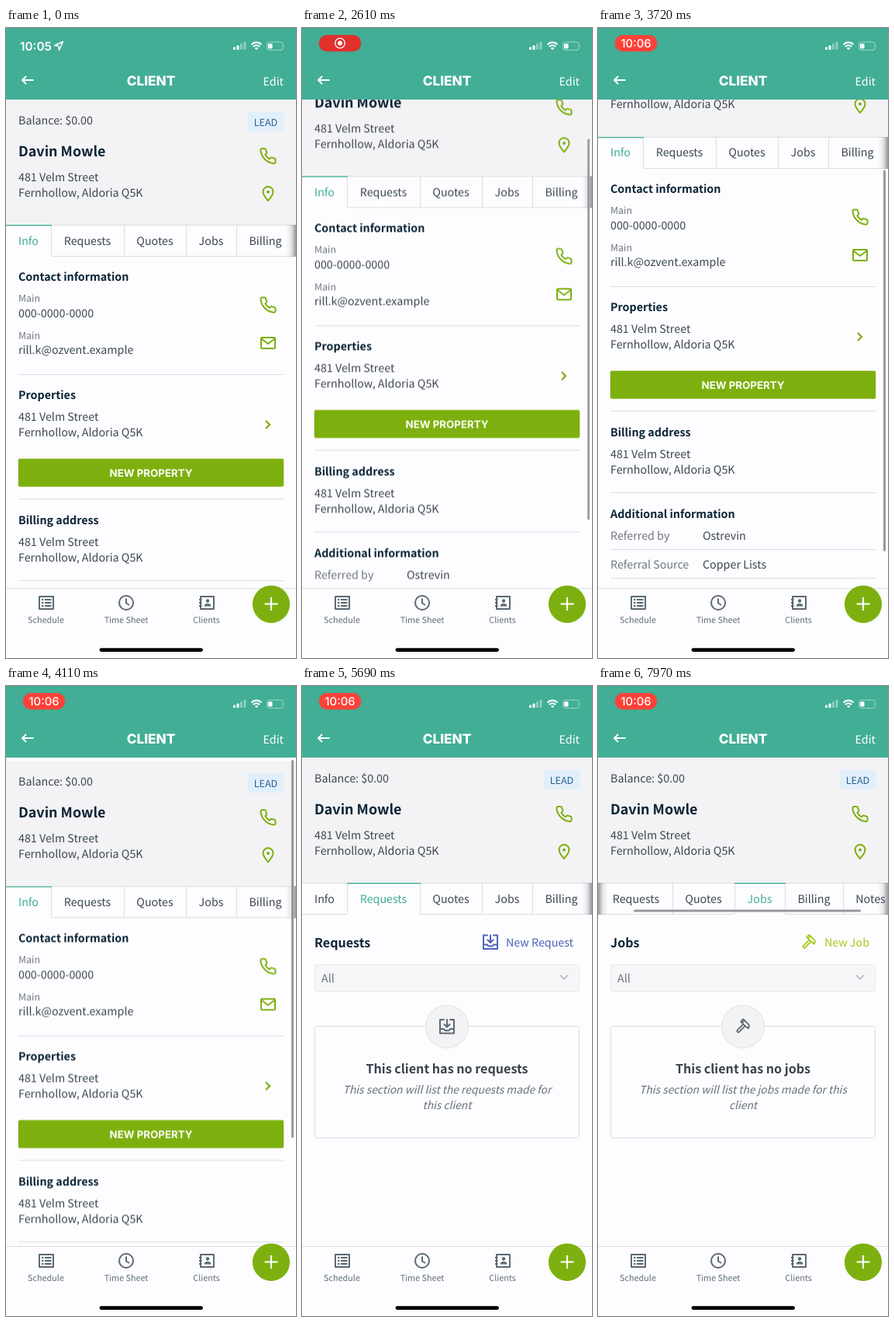
These frames come from a looping animation (374x810 px, 8 s). An HTML page:

```html
<!DOCTYPE html>
<html lang="en">
<head>
<meta charset="utf-8">
<title>Client</title>
<style>
html, body { margin: 0; width: 100%; height: 100%; overflow: hidden; background: #fdfcfe; }
svg { display: block; }
text {
  font: 14.29px "Noto Sans CJK JP", "Noto Sans CJK SC", "Noto Sans CJK", "Open Sans", sans-serif;
  fill: #3a4853; text-rendering: geometricPrecision; white-space: pre;
}
.bold { font-weight: 700; fill: #0a2436; }
.name { font-size: 17.9px; }
.muted { fill: #6b7882; }
.small { font-size: 12.4px; }
.nav { font-size: 10.8px; fill: #5f6f7a; text-anchor: middle; }
.mid { text-anchor: middle; }
.end { text-anchor: end; }
.white { fill: #fff; }
.ui { font-family: Inter, sans-serif; fill: #fff; }
.teal { fill: #41ae95; }
.head { font-size: 16.1px; }
.note { font-size: 13.83px; font-style: italic; fill: #65727c; }
.line { stroke: #dcdde3; stroke-width: 1; fill: none; }
.icon { fill: none; stroke: currentColor; stroke-width: 2; stroke-linejoin: round; stroke-linecap: round; }
.green { color: #7db00e; }
.slate { color: #5a6a75; }
.bar { fill: #98989e; }

#scroll, #thumb, #tabs, #thumbX, .shadeL, .pill, .pill rect, .rec, .clock, .start, .info, .requests, .quotes, .jobs {
  animation: 8s linear infinite;
}
#scroll { animation-name: scroll; }
#thumb { animation-name: thumb; }
#tabs { animation-name: slide; }
#thumbX { animation-name: thumbX; }
.shadeL { animation-name: shade; }
.pill { animation-name: appear; }
.pill rect { animation-name: pulse; }
.rec { animation-name: recording; }
.clock { animation-name: clock; }
.start { animation-name: vanish; }
.info { animation-name: info; }
.requests { animation-name: requests; }
.quotes { animation-name: quotes; }
.jobs { animation-name: jobs; }
.info, .requests, .quotes, .jobs { animation-timing-function: step-end; }

@keyframes scroll {
  0%, 31% { transform: translateY(0); animation-timing-function: ease-in; }
  32.75% { transform: translateY(-70px); }
  34.25% { transform: translateY(-150px); animation-timing-function: ease-out; }
  35.75% { transform: translateY(-179.5px); animation-timing-function: ease-in-out; }
  38.75%, 42% { transform: translateY(-176px); animation-timing-function: ease-in; }
  46.5% { transform: translateY(-113.4px); }
  49.9% { transform: translateY(-8px); animation-timing-function: ease-out; }
  50.6%, 51.375% { transform: translateY(4.4px); animation-timing-function: ease-out; }
  55%, 100% { transform: translateY(0); }
}
@keyframes thumb {
  0%, 31% { transform: translateY(95px); height: 490px; opacity: 0; animation-timing-function: ease-in; }
  32.75% { transform: translateY(148px); height: 490px; opacity: 1; }
  34.25% { transform: translateY(208px); height: 490px; animation-timing-function: ease-out; }
  35.75% { transform: translateY(237px); height: 480px; animation-timing-function: ease-in-out; }
  38.75%, 42% { transform: translateY(228px); height: 490px; animation-timing-function: ease-in; }
  46.5% { transform: translateY(183px); height: 490px; }
  49.9% { transform: translateY(101px); height: 490px; animation-timing-function: ease-out; }
  50.6%, 51.375% { transform: translateY(95px); height: 486px; }
  55% { transform: translateY(95px); height: 490px; opacity: 1; }
  58%, 100% { transform: translateY(95px); height: 490px; opacity: 0; }
}
@keyframes slide {
  0%, 93.2% { transform: translateX(0); animation-timing-function: ease-in-out; }
  99.6%, 100% { transform: translateX(-56px); }
}
@keyframes thumbX {
  0%, 93.2% { transform: translateX(3px); opacity: 0; animation-timing-function: ease-in-out; }
  99.6%, 100% { transform: translateX(46px); opacity: 1; }
}
@keyframes shade { 0%, 93.2% { opacity: 0; } 95%, 100% { opacity: 1; } }
@keyframes appear { 0%, 1% { opacity: 0; } 5%, 100% { opacity: 1; } }
@keyframes vanish { 0%, 1% { opacity: 1; } 4%, 100% { opacity: 0; } }
@keyframes pulse {
  0%, 8% { fill: #ff4036; }
  20%, 36% { fill: #e0302b; }
  42%, 100% { fill: #ff4138; }
}
@keyframes recording { 0%, 40% { opacity: 1; } 42%, 100% { opacity: 0; } }
@keyframes clock { 0%, 41% { opacity: 0; } 43%, 100% { opacity: 1; } }
@keyframes info { 0% { opacity: 1; } 59.375%, 100% { opacity: 0; } }
@keyframes requests { 0% { opacity: 0; } 59.375% { opacity: 1; } 78.125%, 100% { opacity: 0; } }
@keyframes quotes { 0% { opacity: 0; } 78.125% { opacity: 1; } 87.5%, 100% { opacity: 0; } }
@keyframes jobs { 0% { opacity: 0; } 87.5%, 100% { opacity: 1; } }
</style>
</head>
<body>
<svg width="374" height="810" viewBox="0 0 374 810">
  <defs>
    <linearGradient id="fade">
      <stop offset="0" stop-color="#77777f" stop-opacity="0"/>
      <stop offset=".5" stop-color="#77777f" stop-opacity=".16"/>
      <stop offset="1" stop-color="#77777f" stop-opacity=".72"/>
    </linearGradient>
    <!-- icons are centred on 0,0 -->
    <g id="phone" class="icon">
      <path d="M9.5 5v2.7a2 2 0 0 1-2.2 2A19 19 0 0 1-9.6-7.2a2 2 0 0 1 2-2.3h2.9a2 2 0 0 1 2 1.7q.3 1.5.9 2.9a2 2 0 0 1-.5 2L-3.6-1.6a15.5 15.5 0 0 0 5.5 5.5L3.2 2.6a2 2 0 0 1 2-.5q1.4.5 2.7.8a2 2 0 0 1 1.6 2.1z"/>
    </g>
    <g id="pin" class="icon">
      <path d="M0 9C-3.5 5-6.5 1.5-6.5-2.5a6.5 6.5 0 0 1 13 0C6.5 1.5 3.5 5 0 9z"/>
      <circle cy="-2.3" r="2" fill="currentColor" stroke="none"/>
    </g>
    <g id="mail" class="icon">
      <rect x="-9" y="-7" width="18" height="14" rx="1"/>
      <path d="M-8.5-5.5 0 1 8.5-5.5"/>
    </g>
    <path id="right" class="icon" style="stroke-width:2.3;stroke-linecap:butt;stroke-linejoin:miter" d="M-3-5 2 0-3 5"/>
    <path id="down" class="icon" style="stroke-width:1.5" d="M-4.5-2.2 0 2.3 4.5-2.2"/>
    <g id="tray" class="icon">
      <path d="M-4-8.5H-9V9H9V-8.5H4M-9 3.5H-4q.5 2 2 2H2q1.5 0 2-2H9M0-8.5V.5M-3.5-2.5 0 1 3.5-2.5"/>
    </g>
    <g id="hammer" class="icon" transform="rotate(45) scale(.9)">
      <path d="M-1.8-2.5V9.5a1.8 1.8 0 0 0 3.6 0V-2.5M-4.5-7.5H3q3.5 0 4.5 4.5Q5.5-3.5 4-2.5H-4.5zM-4.5-7.5H-7V-2.5H-4.5"/>
    </g>
    <g id="quote" class="icon">
      <path d="M-7-9H3L7-5V9H-7zM-3.5-3H1M-3.5 1H3.5M-3.5 5H3.5"/>
    </g>
  </defs>

  <rect width="374" height="810" fill="#fdfcfe"/>

  <g id="scroll">
    <rect y="92" width="374" height="161" fill="#f3f2f4"/>
    <text x="16" y="124">Balance: $0.00</text>
    <rect x="312" y="108" width="46" height="25" rx="2" fill="#e1effb"/>
    <text x="335" y="126" class="mid" style="font-size:12.5px;fill:#2a5f92">LEAD</text>
    <text x="16" y="165" class="bold name">Davin Mowle</text>
    <text x="16" y="196.5">481 Velm Street</text>
    <text x="16" y="216.5">Fernhollow, Aldoria Q5K</text>
    <g class="green">
      <use href="#phone" x="338" y="164.5"/>
      <use href="#pin" x="338" y="213"/>
    </g>

    <g id="tabs"></g>
    <rect x="361" y="253" width="13" height="41" fill="url(#fade)"/>
    <rect class="shadeL" x="-13" y="253" width="13" height="41" fill="url(#fade)" style="transform:scaleX(-1)"/>
    <rect id="thumbX" class="bar" y="287.5" width="293" height="3" rx="1.5"/>

    <g class="info">
      <text x="16" y="324.5" class="bold">Contact information</text>
      <text x="16" y="352" class="muted small">Main</text>
      <text x="16" y="371.5">000-0000-0000</text>
      <text x="16" y="400" class="muted small">Main</text>
      <text x="16" y="419">rill.k@ozvent.example</text>
      <text x="16" y="477" class="bold">Properties</text>
      <text x="16" y="505">481 Velm Street</text>
      <text x="16" y="525">Fernhollow, Aldoria Q5K</text>
      <g class="green">
        <use href="#phone" x="338" y="356"/>
        <use href="#mail" x="338" y="405"/>
        <use href="#right" x="338" y="510"/>
      </g>
      <rect x="15.8" y="553.7" width="342.4" height="36" rx="2" fill="#7db00e"/>
      <text x="187" y="576.5" class="ui mid" style="font-size:13.3px;font-weight:700">NEW PROPERTY</text>
      <text x="16" y="637.5" class="bold">Billing address</text>
      <text x="16" y="665.5">481 Velm Street</text>
      <text x="16" y="685.5">Fernhollow, Aldoria Q5K</text>
      <text x="16" y="742.5" class="bold">Additional information</text>
      <text x="16" y="770.5" class="muted">Referred by</text>
      <text x="135" y="770.5">Ostrevin</text>
      <text x="16" y="807.5" class="muted">Referral Source</text>
      <text x="135" y="807.5">Copper Lists</text>
      <text x="16" y="844.5" class="muted">Preferred Tech</text>
      <text x="135" y="844.5">Hob</text>
      <path class="line" d="M16 445.5H358M16 605.5H358M16 710.5H358M16 783.5H358M16 820.5H358"/>
    </g>
    <g id="panels"></g>
  </g>

  <rect id="thumb" class="bar" x="368" width="3" height="490" rx="1.5"/>

  <g id="header">
    <rect width="374" height="92" fill="#41ae95"/>
    <g class="start">
      <text x="18" y="28.5" class="ui" style="font-size:15.3px;font-weight:600">10:05</text>
      <path d="M73.5 17.5 62.5 22.5 67.7 23.3 68.5 28.5z" fill="none" stroke="#fff" stroke-width="1.5" stroke-linejoin="round"/>
    </g>
    <g class="pill">
      <rect x="21.8" y="9" width="54.4" height="21.3" rx="10"/>
      <g class="rec">
        <circle cx="49" cy="19.5" r="6.3" fill="none" stroke="#fff" stroke-width="1.3"/>
        <circle cx="49" cy="19.5" r="3" fill="#fff"/>
      </g>
      <text x="49" y="25" class="ui mid clock" style="font-size:14.8px;font-weight:500">10:06</text>
    </g>
    <g fill="#fff">
      <rect x="293" y="24.5" width="3" height="3.5" rx=".7"/>
      <rect x="297.5" y="22.5" width="3" height="5.5" rx=".7"/>
      <rect x="302" y="20" width="3" height="8" rx=".7" opacity=".4"/>
      <rect x="306.5" y="17.5" width="3" height="10.5" rx=".7" opacity=".4"/>
      <rect x="338" y="20" width="5.5" height="6.5" rx="1.3"/>
      <path d="M358.3 21.3q1.5 1.9 0 3.9z" opacity=".5"/>
      <path d="M323 28.3l-2.2-2.3q2.2-1.8 4.4 0z"/>
    </g>
    <rect x="336.5" y="18" width="20.5" height="10.5" rx="3" fill="none" stroke="#fff" opacity=".5"/>
    <path d="M316.5 21.3q6.5-5.8 13 0M318.8 24q4.2-3.5 8.4 0" fill="none" stroke="#fff" stroke-width="2"/>
    <path d="M35.5 67H21.5M26 62 21 67 26 72" fill="none" stroke="#fff" stroke-width="2"/>
    <text x="187" y="74" class="ui mid" style="font-size:17.2px;font-weight:800">CLIENT</text>
    <text x="358" y="74" class="white end">Edit</text>
  </g>

  <g id="footer">
    <rect y="720" width="374" height="90" fill="#fdfcfe"/>
    <path class="line" d="M0 720.5H374"/>
    <g class="slate">
      <g class="icon" style="stroke-linecap:butt">
        <path d="M43 731H61V747H43zM46 735H48.5M46 739H48.5M46 743H48.5M50 735H58.5M50 739H58.5M50 743H58.5"/>
        <circle cx="155" cy="739" r="9"/>
        <path d="M155 733.5V739.5L159 742"/>
        <path d="M251 731H268V747H251zM249 735H252.5M249 739H252.5M249 743H252.5"/>
      </g>
      <g fill="currentColor">
        <circle cx="260" cy="736.5" r="2.2"/>
        <path d="M255.5 743.5q0-3.5 4.5-3.5t4.5 3.5z"/>
      </g>
    </g>
    <text x="51.5" y="765" class="nav">Schedule</text>
    <text x="155" y="765" class="nav">Time Sheet</text>
    <text x="258.5" y="765" class="nav">Clients</text>
    <circle cx="342" cy="740.8" r="24.1" fill="#7db00e"/>
    <path d="M333.5 740.5H350.5M342 732V749" stroke="#fff" stroke-width="2.2"/>
    <rect x="120.5" y="797.2" width="133.5" height="4.8" rx="2.4"/>
  </g>
</svg>

<script>
const tabs = [
  ['Info', 0, 58], ['Requests', 58, 152], ['Quotes', 152, 232],
  ['Jobs', 232, 297], ['Billing', 297, 372], ['Notes', 372, 443]
];
const label = (name, x, end, cls = '') => `<text x="${(x + end) / 2}" y="278.5" class="mid ${cls}">${name}</text>`;
const divider = x => `<path class="line" d="M${x + .5} 254V293"/>`;

const tab = ([name, x, end]) => label(name, x, end) + divider(end);
const activeTab = ([name, x, end]) => `
  <g class="${name.toLowerCase()}">
    <rect x="${x}" y="253" width="${end - x}" height="42" fill="#fdfcfe"/>
    ${x ? divider(x) : ''}${divider(end)}
    <rect x="${x}" y="253" width="${end - x + 1}" height="1.4" fill="#41ae95"/>
    ${label(name, x, end, 'teal')}
  </g>`;

document.getElementById('tabs').innerHTML =
  '<path class="line" d="M0 253.5H480M0 293.5H480"/>' +
  tabs.map(tab).join('') + tabs.slice(0, 4).map(activeTab).join('');

const panels = [
  { title: 'Requests', link: 'New Request', icon: 'tray', iconX: 243, color: '#4a64b8', lines: ['made for', 'this client'] },
  { title: 'Quotes', link: 'New Quote', icon: 'quote', iconX: 256, color: '#a13a72', lines: ['made for', 'this client'] },
  { title: 'Jobs', link: 'New Job', icon: 'hammer', iconX: 272, color: '#a1cc1b', lines: ['made for this', 'client'] }
];

const panel = ({ title, link, icon, iconX, color, lines }) => {
  const noun = title.toLowerCase();
  return `
  <g class="${noun}">
    <text x="16" y="336" class="bold head">${title}</text>
    <use href="#${icon}" x="${iconX}" y="329" style="color:${color}"/>
    <text x="350" y="334.5" class="end" style="fill:${color}">${link}</text>
    <rect x="16.5" y="358.5" width="341" height="34" rx="2" fill="#f6f5f8" stroke="#e8e8ec"/>
    <text x="25" y="381" class="muted">All</text>
    <use href="#down" x="338" y="374.5" style="color:#a9b0b7"/>
    <rect x="16.5" y="437.5" width="341" height="143.5" rx="2" class="line"/>
    <circle cx="187" cy="438" r="27.5" fill="#f3f2f5" stroke="#e0e0e5"/>
    <use href="#${icon}" x="187" y="437.5" class="slate"/>
    <text x="187" y="498" class="bold head mid" style="fill:#36434d">This client has no ${noun}</text>
    <text x="187" y="524" class="note mid">This section will list the ${noun} ${lines[0]}</text>
    <text x="187" y="544" class="note mid">${lines[1]}</text>
  </g>`;
};

document.getElementById('panels').innerHTML = panels.map(panel).join('');
</script>
</body>
</html>
```
